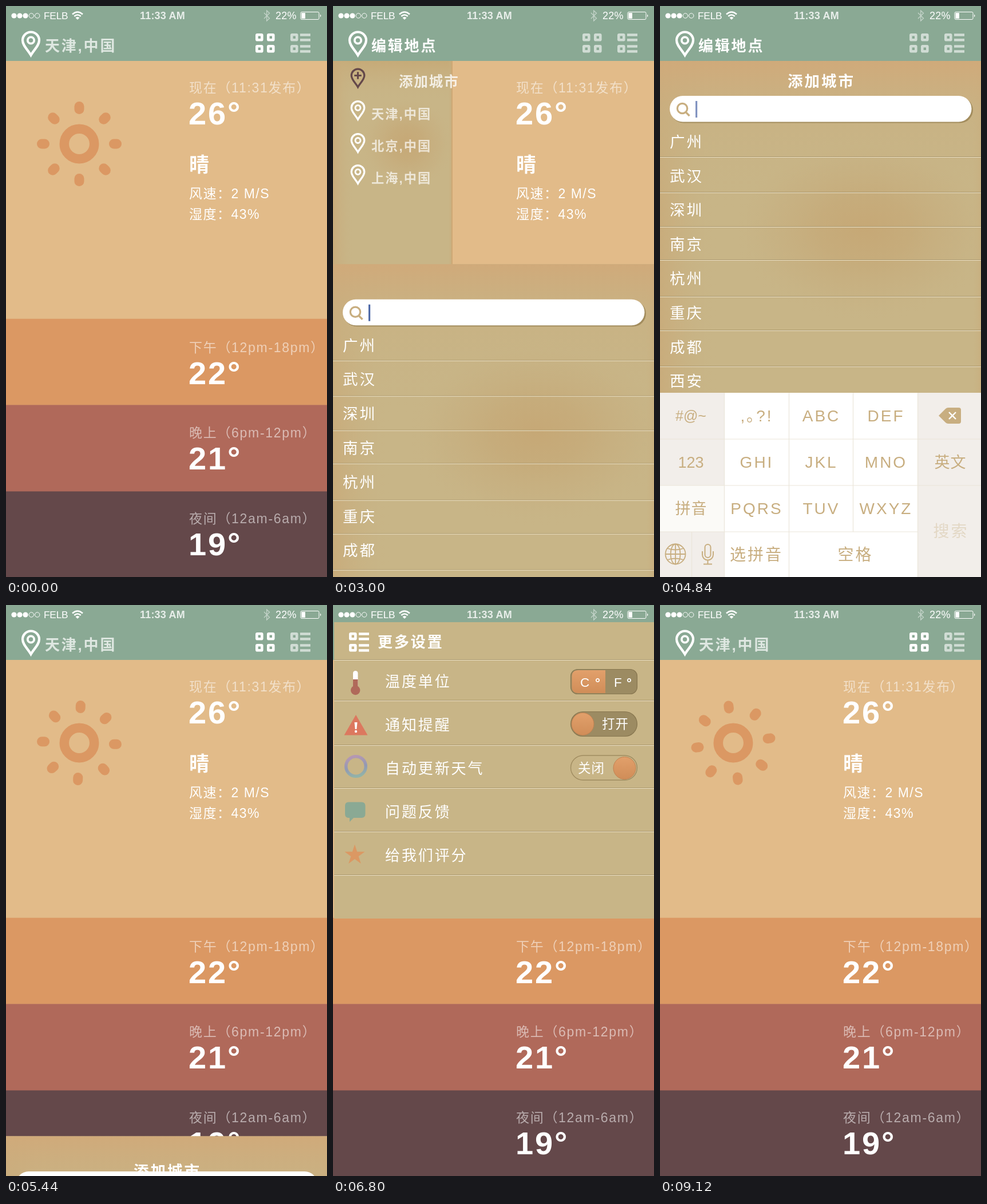
Animation, 561 px wide and 998 px high, one loop 9160 ms. Source, as an HTML page:

```html
<!DOCTYPE html>
<html lang="zh-CN">
<head>
<meta charset="utf-8">
<title>Weather</title>
<style>
  html, body { margin: 0; width: 100%; height: 100%; overflow: hidden; background: #e2bb89; }
  svg { display: block; width: 100%; height: 100%; }
  text { font-family: "Liberation Sans", "Noto Sans CJK SC", "Noto Sans CJK", sans-serif; white-space: pre; }
</style>
</head>
<body>
<svg id="stage" viewBox="0 0 561 998" xmlns="http://www.w3.org/2000/svg"></svg>
<script>
const LOOP = 9160, STEP = 40;
const GREEN = '#8aa994', SAND = '#e2bb89', ORANGE = '#db9863', RED = '#b0695a',
      DARK = '#64484a', KHAKI = '#c8b587', KEY = '#c8ae80', OLIVE = '#9c8b62';

// Text placed by its vertical centre.
function text(str, x, cy, size, opt = {}) {
  const { weight = 300, gap = 1.5, fill = '#fff', alpha = 1, anchor = 'start', id = '' } = opt;
  return `<text ${id && `id="${id}"`} x="${x}" y="${cy + size * 0.37}" font-size="${size}" font-weight="${weight}"
    letter-spacing="${gap}" fill="${fill}" fill-opacity="${alpha}" text-anchor="${anchor}">${str}</text>`;
}
const rect = (x, y, w, h, fill, extra = '') =>
  `<rect x="${x}" y="${y}" width="${w}" height="${h}" fill="${fill}" ${extra}/>`;
const circle = (x, y, r, fill, extra = '') =>
  `<circle cx="${x}" cy="${y}" r="${r}" fill="${fill}" ${extra}/>`;
const path = (d, stroke, width, extra = '') =>
  `<path d="${d}" fill="none" stroke="${stroke}" stroke-width="${width}" ${extra}/>`;
const group = (id, body, extra = '') => `<g id="${id}" ${extra}>${body}</g>`;
const divider = (x, y) =>
  rect(x, y - 1, 561 - x, 1, '#a8956a') + rect(x, y, 561 - x, 1, '#eee2c6');

function pin(x, y, scale, color = '#fff', plus = false) {
  const core = plus ? path('M-8 0H8M0 -8V8', color, 4)
                    : circle(0, 0, 5.7, 'none', `stroke="${color}" stroke-width="3.8"`);
  return `<g transform="translate(${x} ${y}) scale(${scale})">
    ${path('M0 26C-5 17-14.5 9-14.5 0A14.5 14.5 0 0 1 14.5 0C14.5 9 5 17 0 26Z', color, 4.2)}${core}</g>`;
}

const tile = (x, y) =>
  rect(x + 2.3, y + 2.3, 9, 9, 'none', 'stroke="#fff" stroke-width="4.6" rx=".8"');
const gridIcon = tile(436, 48) + tile(456, 48) + tile(436, 68) + tile(456, 68);
const listIcon = (x) => tile(x, 48) + tile(x, 68) +
  [48.3, 57.2, 68.3, 77.2].map(y => rect(x + 17, y, 18, 4.4, '#fff')).join('');

function statusBar() {
  const dots = [14, 24, 34, 44.3, 54.7].map((x, i) => i < 3 ? circle(x, 17, 4.6, '#fff')
    : circle(x, 17, 4.2, 'none', 'stroke="#fff" stroke-width="1"')).join('');
  const wifi = path('M116 14.5Q125 6.5 134 14.5M119.3 18Q125 13 130.7 18', '#fff', 2.6) +
    '<path d="M121.5 20.5Q125 17.5 128.5 20.5L125 24Z" fill="#fff"/>';
  return dots + text('FELB', 66, 17, 17.3, { weight: 400, gap: -.2 }) + wifi +
    text('11:33 AM', 234, 16.8, 18, { weight: 700, gap: .2, alpha: .8 }) +
    path('M451 12L460.5 21.5L455.7 26V8L460.5 12.5L451 22', '#fff', 1.3, 'opacity=".5"') +
    text('22%', 471, 16.8, 18, { weight: 400, gap: .2 }) +
    rect(515, 10.5, 32, 13, 'none', 'rx="2" stroke="#fff" stroke-width="1"') +
    rect(516.5, 12, 6.5, 10, '#fff') + '<path d="M549 14.5Q552 17 549 19.5Z" fill="#fff"/>';
}

function forecast(label, temp, cy) {
  return text(label, 320, cy, 23, { alpha: .55, gap: 1.7 }) +
    text(temp, 319, cy + 44, 56, { weight: 700, gap: 2.8 });
}

function home() {
  const rays = Array.from({ length: 8 }, (_, i) =>
    rect(-8.5, -74, 17, 22, ORANGE, `rx="8.5" transform="rotate(${i * 45})"`)).join('');
  return rect(0, 0, 561, 548, SAND) + rect(0, 546.7, 561, 151, ORANGE) +
    rect(0, 697.3, 561, 152, RED) + rect(0, 848.4, 561, 150, DARK) +
    `<g transform="translate(128 241)">
      ${circle(0, 0, 26.2, 'none', `stroke="${ORANGE}" stroke-width="16.5"`)}${group('rays', rays)}</g>` +
    forecast('现在（11:31发布）', '26°', 142) +
    text('晴', 320, 277, 35, { weight: 700 }) +
    text('风速：2 M/S', 320, 327, 23) + text('湿度：43%', 320, 363, 23) +
    forecast('下午（12pm-18pm）', '22°', 596) +
    forecast('晚上（6pm-12pm）', '21°', 745) +
    forecast('夜间（12am-6am）', '19°', 895);
}

const PLACES = [['天津,中国', 178, 189], ['北京,中国', 235, 245], ['上海,中国', 290, 301]];
function sidebar() {
  const places = PLACES.map(([name, pinY, textY], i) => group('item' + (i + 1),
    pin(43.5, pinY, .78) + text(name, 67, textY, 22.3, { weight: 700, gap: 2, alpha: .68 }))).join('');
  const fills = [KHAKI, 'url(#edge)', 'url(#rim)', 'url(#glowSmall)'];
  return group('drawer', rect(206, 96, 3, 450, '#a9844f', 'opacity=".35"') +
      fills.map(fill => rect(0, 96, 207, 450, fill)).join('')) +
    group('item0', pin(43.5, 121.5, .78, DARK, true)) + places;
}

const CITIES = ['广州', '武汉', '深圳', '南京', '杭州', '重庆', '成都', '西安'];
const CITY_LINES = [264, 326, 386, 444, 508, 567, 630];
function picker() {
  const fills = [KHAKI, 'url(#rim)', 'url(#topFade)', 'url(#glow)'];
  const back = fills.map(fill => rect(0, 95.5, 561, 903, fill)).join('');
  const front = rect(19, 159.5, 528, 45, '#a38d5e', 'rx="22.5"') +
    rect(17, 157, 527.5, 45.5, '#fff', 'rx="22.7"') +
    circle(39, 179, 8.7, 'none', `stroke="${KEY}" stroke-width="3.2"`) +
    path('M45 185.5L51.5 192', KEY, 3.4) +
    rect(62, 166, 3.2, 29, '#4f6aa8', 'id="cursor"') +
    CITIES.map((city, i) => text(city, 17, 237 + i * 59.8, 26.5, { gap: 3 })).join('') +
    CITY_LINES.map(y => divider(0, y)).join('');
  return group('pickerBack', back) +
    text('添加城市', 65, 132.5, 23.5, { weight: 700, id: 'addLabel' }) + group('pickerFront', front);
}

function keyboard() {
  const X = [55, 168.5, 281.5, 394.5, 508], Y = [716, 797, 878, 958];
  const key = (str, x, y, size = 28, gap = 3, alpha = 1) =>
    text(str, x - 1 + gap / 2, y, size, { gap, alpha, fill: KEY, anchor: 'middle', weight: 300 });
  const letters = [',｡?!', 'ABC', 'DEF', 'GHI', 'JKL', 'MNO', 'PQRS', 'TUV', 'WXYZ']
    .map((s, i) => key(s, X[1 + i % 3], Y[Math.floor(i / 3)])).join('');
  const globe = circle(27, 958, 17.5, 'none', `stroke="${KEY}" stroke-width="1.8"`) +
    `<ellipse cx="27" cy="958" rx="8.5" ry="17.5" fill="none" stroke="${KEY}" stroke-width="1.8"/>` +
    path('M9.5 958H44.5M27 940.5V975.5M13 948Q27 953 41 948M13 968Q27 963 41 968', KEY, 1.8);
  const mic = rect(78.5, 941, 10, 23, 'none', `rx="5" stroke="${KEY}" stroke-width="2"`) +
    path('M74 953V959A9.5 9.5 0 0 0 93 959V953M83.5 968.5V975.5M76 975.5H91', KEY, 2);
  const erase = `<path d="M487 716L499 704Q501 702 504 702H522Q526 702 526 706V726Q526 730 522 730H504Q501 730 499 728Z" fill="${KEY}"/>` +
    path('M505 710L517 722M517 710L505 722', '#fff', 2.4);
  return rect(0, 676, 561, 322, '#f2eeea') + rect(112, 676, 338, 322, '#fff') +
    rect(0, 838, 112, 81, '#fbfaf7') +
    path('M0 757H561M0 838H561M0 919H450M112.5 676V998M225.5 676V998M337.5 676V919M450.5 676V998M55.5 919V998',
      '#ebe5da', 1.2) +
    letters + key('#@~', X[0], Y[0], 25, 0) + key('123', X[0], Y[1], 27, 0) +
    key('拼音', X[0], Y[2], 27, 1) + key('英文', X[4], Y[1], 27, 1) +
    key('选拼音', 168, 959) + key('空格', 341, 959) +
    key('搜索', X[4], 918, 28, 3, .35) + globe + mic + erase;
}

function header() {
  const title = (id, str, x, alpha) => group(id, text(str, x, 69, 26, { weight: 700, gap: 2.8, alpha }));
  return rect(0, 0, 561, 96, GREEN) + pin(43.5, 60, 1) +
    title('cityTitle', '天津,中国', 68, .72) + title('editTitle', '编辑地点', 67, 1) +
    group('gridIcon', gridIcon) + group('listIcon', listIcon(497), 'opacity=".6"');
}

function settings() {
  const label = (str, y) => text(str, 91, y, 26, { gap: 2.9 });
  const small = (str, x, y, weight = 300) => text(str, x, y, 22.5, { gap: 1, weight });
  const knob = (x, y) => circle(x, y, 19.5, 'url(#knob)', 'stroke="#c28150" stroke-width="1"');
  const star = Array.from({ length: 10 }, (_, i) => {
    const a = i * Math.PI / 5, r = i % 2 ? 7 : 18.5;
    return `${38 + r * Math.sin(a)},${437 - r * Math.cos(a)}`;
  }).join(' ');
  return rect(2, 30, 559, 518, KHAKI) +
    [96, 167, 245, 320, 396, 472].map(y => divider(2, y)).join('') +
    listIcon(28) + text('更多设置', 78, 64, 26, { weight: 700, gap: 2.9 }) +
    ['温度单位', '通知提醒', '自动更新天气', '问题反馈', '给我们评分'].map((s, i) => label(s, 133 + i * 76)).join('') +
    rect(35, 115, 8.5, 30, '#fff', 'rx="4.2"') + rect(35, 130, 8.5, 18, RED) + circle(39.2, 149, 8.2, RED) +
    '<path d="M40 192L60.5 227.5H19.5Z" fill="#dc785f"/><path d="M37.5 205H42.5L41.3 217H38.7Z" fill="#fff"/>' +
    circle(40, 221, 2.2, '#fff') +
    circle(40, 282, 17.3, 'none', 'stroke="url(#ring)" stroke-width="5.5"') +
    `<path d="M27 344.5H50Q56.5 344.5 56.5 351V365Q56.5 372 50 372H36L29 379V372H27Q21 372 21 365V351Q21 344.5 27 344.5Z" fill="${GREEN}"/>` +
    `<polygon points="${star}" fill="${ORANGE}"/>` +
    rect(415.5, 112.5, 116, 43, OLIVE, 'rx="12" stroke="#87764f" stroke-width="1.2"') +
    '<path d="M429 114H476V154H429Q417.5 154 417.5 143V125Q417.5 114 429 114Z" fill="url(#knob)"/>' +
    small('C', 432, 135) + small('°', 458, 136, 700) + small('F', 491, 135) + small('°', 513, 136, 700) +
    rect(415.5, 186.5, 116, 43, OLIVE, 'rx="21.5" stroke="#87764f" stroke-width="1.2"') +
    knob(436.5, 208) + small('打开', 470, 208) +
    rect(415.5, 263, 116, 43, 'none', 'rx="21.5" stroke="#a08c60" stroke-width="1.4"') +
    knob(509.5, 285) + small('关闭', 428, 285);
}

const stops = (...list) => list.map(([offset, color, alpha]) =>
  `<stop offset="${offset}" stop-color="${color}" stop-opacity="${alpha}"/>`).join('');
const glowStops = stops([0, '#c6a876', 1], [.35, '#c6ab7a', .9], [.7, '#c7b081', .6], [1, KHAKI, 0]);
const defs = `<defs>
  <radialGradient id="glow" gradientUnits="userSpaceOnUse" cx="0" cy="0" r="1" gradientTransform="translate(358 390) scale(235 165)">
    ${glowStops}</radialGradient>
  <radialGradient id="glowSmall" gradientUnits="userSpaceOnUse" cx="130" cy="240" r="84">${glowStops}</radialGradient>
  <linearGradient id="topFade" x2="0" y2="1">${stops([0, '#d0aa7a', 1], [.11, '#c9b081', .5], [.3, KHAKI, 0])}</linearGradient>
  <linearGradient id="edge" x2="0" y2="1">${stops([0, '#c6a976', .9], [.16, KHAKI, 0], [.9, KHAKI, 0], [1, '#c6a774', .9])}</linearGradient>
  <linearGradient id="rim">${stops([0, '#c9aa79', .8], [.18, KHAKI, 0], [.97, KHAKI, 0], [1, '#c9ab7a', .6])}</linearGradient>
  <linearGradient id="ring" x1=".4" x2=".6" y2="1">${stops([0, '#b598b2', 1], [.55, '#9299b4', 1], [1, '#92b3a8', 1])}</linearGradient>
  <linearGradient id="knob" x2="0" y2="1">${stops([0, '#e2a06b', 1], [1, '#d08d58', 1])}</linearGradient>
</defs>`;

const stage = document.getElementById('stage');
stage.innerHTML = defs + home() + sidebar() + picker() + group('keyboard', keyboard()) +
  header() + group('settings', settings()) + group('status', statusBar());

const parts = Object.fromEntries([...stage.querySelectorAll('g[id], text[id], rect[id]')].map(el => [el.id, el]));
const set = (id, name, value) => parts[id].setAttribute(name, value);
const move = (id, x, y = 0) => set(id, 'transform', `translate(${x} ${y})`);
const show = (id, on) => set(id, 'visibility', on ? 'visible' : 'hidden');
const span = (t, from, to) => Math.min(1, Math.max(0, (t - from) / (to - from)));
const easeIn = p => p * p;
const easeOut = p => 1 - (1 - p) * (1 - p);
const mix = (a, b, p) => a + (b - a) * p;
const itemOffset = (t, start) => mix(-160, 0, easeOut(span(t, start, start + 200)));

function drawSidebar(t) {
  const open = t > 920 && t < 4840;
  show('drawer', open);
  move('drawer', mix(-210, 0, easeOut(span(t, 920, 1120))));
  for (let i = 0; i < 4; i++) {
    const start = 1120 + i * 200;
    show('item' + i, open && t > start);
    move('item' + i, itemOffset(t, start));
  }
}

function drawPicker(t) {
  const rise = span(t, 2600, 3260), drop = Math.max(0, t - 4840) * 833 / 600;
  const y = mix(903, 0, rise) + drop;
  for (const id of ['pickerBack', 'pickerFront']) {
    show(id, y < 903);
    move(id, 0, y);
  }
  const grow = easeIn(span(t, 2640, 3280));
  show('addLabel', t > 1120 && drop < 903);
  set('addLabel', 'font-size', mix(23.5, 26.5, grow));
  set('addLabel', 'letter-spacing', mix(1.5, 3, grow));
  set('addLabel', 'fill-opacity', mix(.68, 1, grow));
  move('addLabel', itemOffset(t, 1120) + 158 * grow, drop * 1.03);

  const blink = Math.abs(span(t, 4240, 4480) * 2 - 1);
  set('cursor', 'opacity', t < 4800 ? blink : .72);
  const keys = mix(322, 0, span(t, 3600, 4200)) + Math.max(0, t - 4840) * 1.4;
  show('keyboard', keys < 322);
  move('keyboard', 0, keys);
}

function drawHeader(t) {
  const edit = span(t, 720, 920) - span(t, 4840, 5040);
  const editShown = t < 3000 ? span(t, 840, 1040) : 1 - span(t, 4840, 5000);
  const cityGone = t < 3000 ? span(t, 720, 880) : 1 - span(t, 4920, 5080);
  set('gridIcon', 'opacity', mix(1, .6, edit));
  set('cityTitle', 'opacity', 1 - cityGone);
  move('cityTitle', 0, -11 * cityGone);
  set('editTitle', 'opacity', editShown);
  move('editTitle', 0, -11 * (1 - editShown));
}

function draw(t) {
  set('rays', 'transform', `rotate(${t * 0.0831})`);
  drawSidebar(t);
  drawPicker(t);
  drawHeader(t);
  const x = 559 * (t < 7200 ? 1 - easeOut(span(t, 6223, 6800)) : easeIn(span(t, 7600, 8180)));
  show('settings', x < 559);
  move('settings', x);
}

function tick(now) {
  draw(Math.floor((now % LOOP) / STEP) * STEP);
  requestAnimationFrame(tick);
}
draw(0);
requestAnimationFrame(tick);
</script>
</body>
</html>
```
